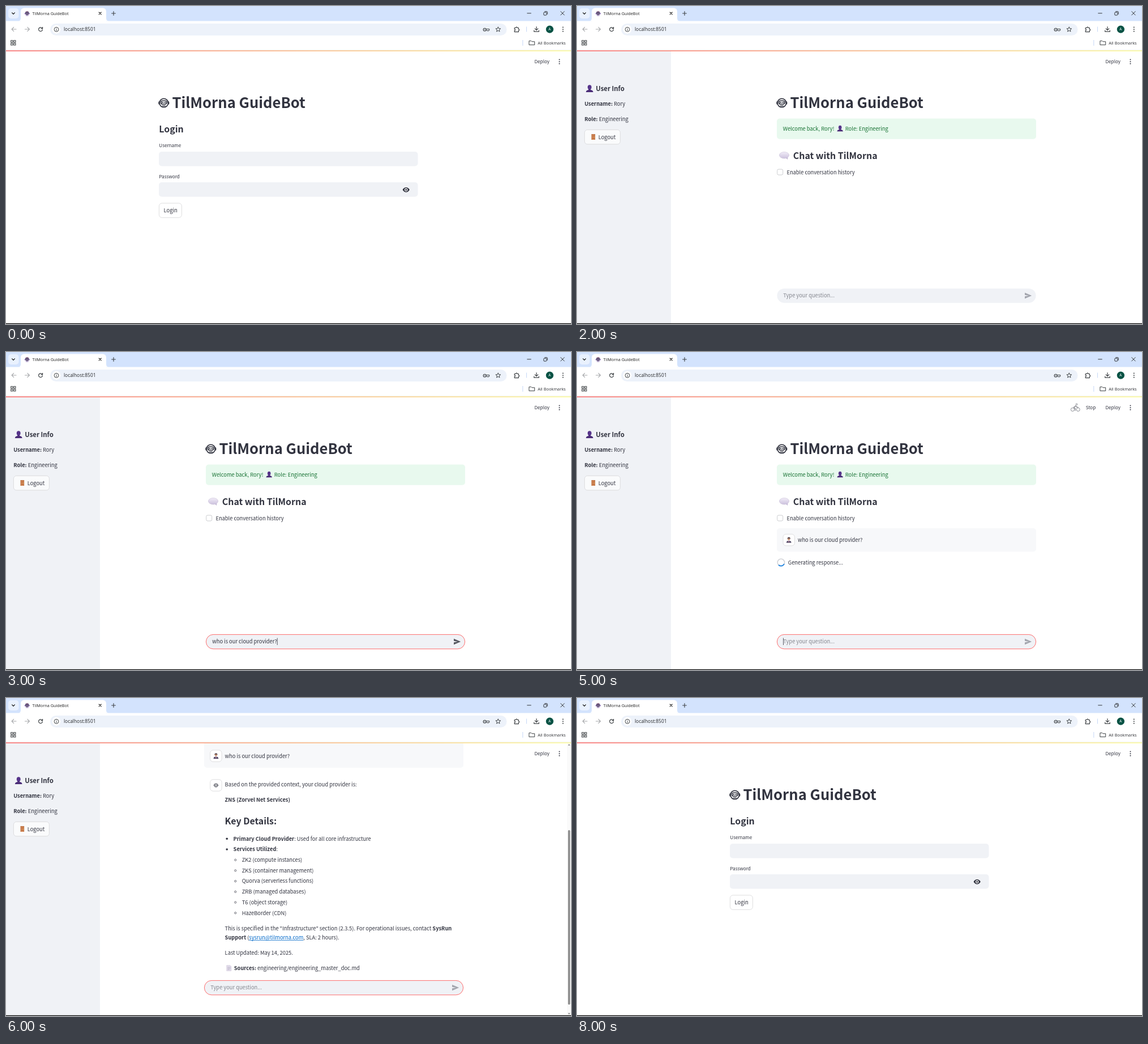
Animation, 998 px wide and 561 px high, one loop 9000 ms. Source, as an HTML page with a canvas:

```html
<!DOCTYPE html>
<html lang="en">
<head>
<meta charset="utf-8">
<title>TilMorna GuideBot</title>
<style>
html, body { margin: 0; width: 100%; height: 100%; overflow: hidden; background: #fff; }
canvas { display: block; width: 998px; height: 561px; }
</style>
</head>
<body>
<canvas id="stage"></canvas>
<script>
const W = 998, H = 561, LOOP = 9000;
const cv = document.getElementById('stage'), g = cv.getContext('2d');
const dpr = window.devicePixelRatio || 1;
cv.width = Math.round(W * dpr);
cv.height = Math.round(H * dpr);

const APP = '"Noto Sans CJK JP", "Noto Sans CJK SC", "Noto Sans CJK KR", "Noto Sans CJK", "Open Sans", sans-serif';
const UI = '"Open Sans", "Noto Sans", sans-serif';
const INK = '#31333f', RED = '#ff4b4b', PALE = '#f0f2f6', LINE = '#d6d6d9', HINT = '#84868e', CHROME = '#3c4043';
const BODY = 9.31, LABEL = 8.15, HEAD = 15.9, TITLE = 25.6;
const BRAND = 'TilMorna', BOT = BRAND + ' GuideBot', USER = 'Rory', ROLE = 'Engineering';
const QUESTION = 'who is our cloud provider?';

function box(x, y, w, h, r, fill, stroke, lw = 0.8) {
  g.beginPath();
  g.roundRect(x, y, w, h, r);
  paint(fill, stroke, lw);
}
function dot(x, y, r, fill, stroke, lw = 1) {
  g.beginPath();
  g.arc(x, y, r, 0, 7);
  paint(fill, stroke, lw);
}
function paint(fill, stroke, lw) {
  if (fill) { g.fillStyle = fill; g.fill(); }
  if (stroke) { g.strokeStyle = stroke; g.lineWidth = lw; g.stroke(); }
}
function icon(x, y, d, fill, stroke, lw = 1) {
  const p = new Path2D(d);
  g.save();
  g.translate(x, y);
  g.lineCap = g.lineJoin = 'round';
  if (fill) { g.fillStyle = fill; g.fill(p); }
  if (stroke) { g.strokeStyle = stroke; g.lineWidth = lw; g.stroke(p); }
  g.restore();
}
// Text centred on y by its capitals; ** toggles bold. Returns the end x.
function text(s, x, y, size = BODY, color = INK, family = APP) {
  g.fillStyle = color;
  s.split('**').forEach((part, i) => {
    g.font = `${i % 2 ? 700 : 400} ${size}px ${family}`;
    g.fillText(part, x, y + size * 0.365);
    x += g.measureText(part).width;
  });
  return x;
}
function kebab(x, y, color) {
  for (let i = -1; i < 2; i++) dot(x, y + i * 3.6, 1, color);
}

function browser() {
  box(0, 0, W, 26.5, 0, '#d3e3fd');
  box(4, 4, 18.5, 18, 5, '#e9f1fe');
  icon(13, 13, 'M-2.4-1.1 0 1.3 2.4-1.1', null, '#1f1f1f', 1.3);
  box(26, 3.5, 151, 24, [6, 6, 0, 0], '#fff');
  icon(26, 26.5, 'M0-5Q0 0-5 0H0Z', '#fff');
  icon(177, 26.5, 'M0-5Q0 0 5 0H0Z', '#fff');
  favicon(37.3, 13.2);
  text(BOT, 46.5, 13.2, 7.3, '#1f1f1f', UI);
  icon(166.2, 13, 'M-2-2 2 2M2-2-2 2', null, '#1f1f1f', 1.1);
  icon(190, 13, 'M-3.4 0H3.4M0-3.4V3.4', null, CHROME, 1.1);
  icon(924, 12.8, 'M-3.3 0H3.3', null, '#222', 0.9);
  box(949.8, 11.2, 5, 5, 1, null, '#222', 0.9);
  icon(953, 13, 'M-1.3-3.3H2Q3.3-3.3 3.3-2V1.4', null, '#222', 0.9);
  icon(983, 12.8, 'M-3.2-3.2 3.2 3.2M3.2-3.2-3.2 3.2', null, '#222', 0.9);

  icon(14, 41, 'M4-0H-3.8M-0.3-3.6-3.9 0-0.3 3.6', null, '#a5a7aa', 1.1);
  icon(37.5, 41, 'M-4 0H3.8M0.3-3.6 3.9 0 0.3 3.6', null, '#a5a7aa', 1.1);
  icon(61, 41, 'M2.9-1.6A3.4 3.4 0 1 0 3.4 0.8M3.6-3.6V-1H1', null, CHROME, 1.2);
  box(78, 31, 806.5, 21, 10.5, '#edf2fa');
  dot(89, 41.3, 7.5, '#fff');
  dot(89, 41.3, 3.9, null, CHROME, 1);
  icon(89, 41.3, 'M0-0.2V1.9M0-1.9V-1.8', null, CHROME, 1);
  text('localhost:8501', 102, 41.4, 8.4, '#26282b', UI);
  dot(845.6, 41.7, 2.5, null, CHROME, 1.1);
  dot(845.6, 41.7, 0.8, CHROME);
  icon(850.5, 41.7, 'M-2.2-1.1H3.2V1.3H1.8V2.2H0V1.3H-2.2', null, CHROME, 1);
  star(869.3, 41.4);
  icon(902, 41.5, 'M-3.8-3H-1.4A1.3 1.3 0 0 1 1.2-3H3.3V-0.7A1.3 1.3 0 0 1 3.3 1.9V4.2H-3.8V1.9A1.3 1.3 0 0 0-3.8-0.7Z', null, CHROME, 1.2);
  box(919, 36.5, 1, 9, 0, '#c6d8f7');
  icon(937, 41, 'M0-4.3V1.4M-2.8-1.1 0 1.6 2.8-1.1M-4.3 2V4.2H4.3V2', null, CHROME, 1.2);
  dot(960.4, 41.2, 6.6, '#075244');
  text('A', 958.3, 41.2, 6.3, '#fff', UI);
  kebab(983.8, 41.2, CHROME);

  for (const x of [8.7, 13.7]) for (const y of [60.8, 65.8]) box(x, y, 3.2, 3.2, 0, null, CHROME, 1.1);
  box(912.3, 60, 1, 10, 0, '#c6d8f7');
  icon(929, 65, 'M-4.7-3.4H-1.2L0-2.2H4.7V3.6H-4.7Z', null, CHROME, 1);
  text('All Bookmarks', 939.3, 65.1, 7.4, '#303236', UI);
}
function star(x, y) {
  g.beginPath();
  for (let i = 0; i < 10; i++) {
    const a = i * Math.PI / 5 - Math.PI / 2, r = i % 2 ? 2 : 4.6;
    g.lineTo(x + r * Math.cos(a), y + r * Math.sin(a));
  }
  g.closePath();
  paint(null, CHROME, 1);
}
function favicon(x, y) {
  dot(x - 3.6, y + 0.3, 1.1, '#8d66c5');
  dot(x + 3.6, y + 0.3, 1.1, '#8d66c5');
  box(x - 3.4, y - 3.4, 6.8, 5.6, 2.4, '#4c3b62');
  box(x - 2.6, y + 2.2, 5.2, 2.2, 1, '#a391bd');
  dot(x - 1.4, y - 0.6, 0.8, '#e7dcf5');
  dot(x + 1.4, y - 0.6, 0.8, '#e7dcf5');
  dot(x, y - 4, 0.7, '#d36a96');
}
function robot(x, y, s) {
  g.save();
  g.translate(x, y);
  g.scale(s, s);
  box(-9.5, -2.4, 2.8, 4.8, 1.2, INK);
  box(6.7, -2.4, 2.8, 4.8, 1.2, INK);
  dot(0, 0, 7.7, '#fff', INK, 1.8);
  box(-5.2, -3.8, 10.4, 6.2, 3.1, '#fff', INK, 1.5);
  icon(0, 0, 'M-3.4 0.1Q-2.2-2.2-1 0.1M1 0.1Q2.2-2.2 3.4 0.1', null, INK, 1.2);
  icon(0, 0, 'M-2.4 4.9Q0 5.7 2.4 4.9', null, INK, 1.2);
  g.restore();
}
function person(x, y, s) {
  g.save();
  g.translate(x, y);
  g.scale(s, s);
  icon(0, 0, 'M-6.5 6.4Q-6.3 2.8-2.1 2.2L-1.7 0H1.7L2.1 2.2Q6.3 2.8 6.5 6.4Z', '#4b2d78');
  g.beginPath();
  g.ellipse(0, -2.5, 3.5, 4.2, 0, 0, 7);
  paint('#56348a');
  g.restore();
}
function userFace(x, y) {
  box(x - 10.2, y - 10.2, 20.4, 20.4, 5, '#fff', LINE);
  icon(x, y, 'M-4.4 5Q-4.2 1.7-1.2 1.3H1.2Q4.2 1.7 4.4 5Z', '#514764');
  icon(x, y, 'M-1.4 1.2H1.4L0 4Z', '#e8e5ee');
  icon(x, y, 'M0 1.6V4', null, '#9b4968', 0.8);
  dot(x, y - 1.6, 2.2, '#c99576');
  icon(x, y, 'M-2.5-1.6Q-2.8-4.8 0.2-4.8 2.8-4.7 2.5-1.6 1.6-3 0-2.9-1.6-3-2.5-1.6Z', '#44333b');
}
function door(x, y) {
  box(x - 3.3, y - 4.9, 6.6, 9.8, 0.5, '#b0683a');
  box(x - 2.6, y - 4.2, 5.2, 9.1, 0.3, '#d88c5c');
  box(x - 1.7, y - 3.2, 3.4, 3, 0, '#c27646');
  box(x - 1.7, y + 0.9, 3.4, 3, 0, '#c27646');
  dot(x + 1.8, y + 0.3, 0.6, '#f2c868');
}
function balloon(x, y) {
  const fill = g.createLinearGradient(0, y - 6, 0, y + 6);
  fill.addColorStop(0, '#f0ebf7');
  fill.addColorStop(1, '#c9bedb');
  icon(x, y, 'M2 3 5.9 6.9 6.4 2Z', '#c1b4d4');
  g.beginPath();
  g.ellipse(x, y - 0.8, 8.6, 5.7, 0, 0, 7);
  paint(fill, '#c8bfd7', 0.6);
}
function page(x, y) {
  icon(x, y, 'M-3.7-4.8H2L3.9-2.9V4.8H-3.7Z', '#e4deec', '#c6bdd3', 0.6);
  icon(x, y, 'M-2.2-1.5H2.2M-2.2 0.5H2.2M-2.2 2.5H1', null, '#a29ab2', 0.6);
}
function cyclist(x, y) {
  const c = '#6f717a';
  dot(x - 4.9, y + 3.5, 3, null, c, 0.8);
  dot(x + 4.9, y + 3.5, 3, null, c, 0.8);
  dot(x + 2.2, y - 5.6, 1.4, null, c, 0.8);
  icon(x, y, 'M-0.2 5.2V1.8L-2.9-0.3 0.4-3.2 2.4-0.8H4.8', null, c, 1.1);
}
function runner(x, y) {
  const c = '#6f717a';
  dot(x + 2.2, y - 5.4, 1.4, null, c, 0.8);
  icon(x, y, 'M-4-0.6-2.8-3 1-3.2 2.6-0.8 5-1.6M0.6-3-0.8 0.8 2 3 1.2 6.6M-0.8 1-2 4H-5.4', null, c, 1.1);
}

function header() {
  const line = g.createLinearGradient(0, 0, W, 0);
  line.addColorStop(0, RED);
  line.addColorStop(1, '#fffd80');
  box(0, 77.8, W, 0.7, 0, '#dcdfe4');
  box(0, 78.4, W, 1.4, 0, line);
  text('Deploy', 933.5, 98.4, LABEL);
  kebab(977.5, 98.2, INK);
}
function title(x) {
  robot(x + 8.8, 171, 1);
  text(`**${BOT}**`, x + 23.4, 171, TITLE);
}

function login(filled) {
  title(270);
  text('**Login**', 270.3, 217.5, HEAD);
  text('Username', 270.3, 246.5, LABEL);
  box(270, 257, 457.5, 25.5, 5, PALE);
  text('Password', 270.3, 301, LABEL);
  box(270, 311, 457.5, 25.5, 5, PALE);
  icon(706.7, 324.3, 'M-6.2 0Q-3.6-4.2 0-4.2T6.2 0Q3.6 4.2 0 4.2T-6.2 0Z', INK);
  dot(706.7, 324.3, 2.1, INK, '#fff', 1.2);
  box(270.4, 347.9, 40, 25.4, 5, '#fff', filled ? RED : LINE);
  text('Login', 278.6, 360.4, BODY, filled ? RED : INK);
  if (filled) {
    text(USER, 281, 269.8);
    for (let i = 0; i < 7; i++) dot(282.6 + i * 4.8, 324.2, 1.7, INK);
  }
}
function sidebar(hover) {
  box(0, 80, 166, 480, 0, PALE);
  person(22.2, 145.8, 0.98);
  text('**User Info**', 33.3, 146, 11.4);
  text(`**Username:** ${USER}`, 13.2, 172.3);
  text(`**Role:** ${ROLE}`, 13.2, 199.3);
  box(13.4, 218.4, 63, 25.4, 5, '#fafbfc', hover ? RED : LINE);
  door(28.8, 231);
  text('Logout', 37.8, 231.2, BODY, hover ? RED : INK);
}
function prompt(x, focus, typed) {
  box(x + 0.4, 498.4, 457.2, 25.4, 12.7, PALE, focus && RED);
  const end = text(typed || 'Type your question...', x + 11.3, 510.8, BODY, typed ? INK : HINT);
  icon(x + 444, 511, 'M-6-5.3 6.2 0-6 5.3V1.2L1 0-6-1.2Z', typed ? '#55575f' : '#a3a5ad');
  return end;
}
function caret(x) {
  box(x, 504.5, 0.8, 12.5, 0, INK);
}
function chat() {
  title(353);
  box(353, 198.5, 458, 36.3, 5, '#e8f9ee');
  const green = '#177233';
  text(`Welcome back, ${USER}!`, 363.8, 216.6, BODY, green);
  person(464.7, 216.2, 0.8);
  text(`Role: ${ROLE}`, 473.8, 216.6, BODY, green);
  balloon(366, 264);
  text(`**Chat with ${BRAND}**`, 381.8, 264.3, HEAD);
  box(353.7, 288, 10, 10, 2.4, '#fff', '#bfc0c5');
  text('Enable conversation history', 370.4, 293.2);
}
function waiting(angle, sport) {
  chat();
  sport(880.3, 98);
  text('Stop', 898.8, 98.2, LABEL);
  box(353, 311, 458, 41.3, 5, '#f7f8fa');
  userFace(374.2, 331.6);
  text(QUESTION, 390, 331.9);
  dot(360.4, 371.2, 6.2, null, '#d4d5d9', 1.7);
  g.beginPath();
  g.arc(360.4, 371.2, 6.2, angle - 0.95, angle + 0.95);
  paint(null, '#1c83e1', 1.9);
  text('Generating response...', 372.8, 371.6);
  prompt(353, true);
  caret(364.2);
}
function answer() {
  const x = 386.6;
  box(350, 80, 458, 43, [0, 0, 5, 5], '#f7f8fa');
  userFace(370.9, 102.2);
  text(QUESTION, x, 102.5);
  box(360.7, 143.8, 20.4, 20.4, 5, '#fff', LINE);
  robot(370.9, 154, 0.42);
  text('Based on the provided context, your cloud provider is:', x, 152.4);
  text('**ZNS (Zorvel Net Services)**', x, 179.4);
  text('**Key Details:**', x, 217.2, HEAD);
  ['**Primary Cloud Provider**: Used for all core infrastructure', '**Services Utilized**:'].forEach((s, i) => {
    const y = 248.3 + i * 18.7;
    dot(390.2, y, 1.8, INK);
    text(s, 401.6, y);
  });
  ['ZK2 (compute instances)', 'ZKS (container management)', 'Quorva (serverless functions)',
   'ZRB (managed databases)', 'T6 (object storage)', 'HazeBorder (CDN)'].forEach((s, i) => {
    const y = 285.7 + i * 18.7;
    dot(405.2, y, 1.6, null, INK, 0.7);
    text(s, 416.7, y);
  });
  text('This is specified in the "Infrastructure" section (2.3.5). For operational issues, contact **SysRun**', x, 406.3);
  const from = text('**Support** (', x, 422.9);
  const to = text('sysrun@tilmorna.com', from, 422.9, BODY, '#0068c9');
  box(from, 427.3, to - from, 0.7, 0, '#0068c9');
  text(', SLA: 2 hours).', to, 422.9);
  text('Last Updated: May 14, 2025.', x, 449.8);
  page(393.8, 476.5);
  text('**Sources:** engineering/engineering_master_doc.md', 402.8, 476.8);
  prompt(350, true);

  box(991, 80, 7, 480, 0, '#fafafa');
  box(992.8, 233, 3.6, 308, 1.8, '#8b8b8b');
  icon(994.6, 82.5, 'M-2 1.2H2L0-1.4Z', '#8b8b8b');
  icon(994.6, 557, 'M-2-1.2H2L0 1.4Z', '#8b8b8b');
}

// One scene per second.
const scenes = [
  () => login(false),
  () => login(true),
  () => { sidebar(); chat(); prompt(353, false); },
  () => { sidebar(); chat(); caret(prompt(353, true, QUESTION)); },
  () => { sidebar(); waiting(-0.8, runner); },
  () => { sidebar(); waiting(1.4, cyclist); },
  () => { sidebar(); answer(); },
  () => { sidebar(true); waiting(2.9, runner); },
  () => login(false)
];

function frame() {
  const t = performance.now() % LOOP;
  g.setTransform(dpr, 0, 0, dpr, 0, 0);
  box(0, 0, W, H, 0, '#fff');
  browser();
  scenes[Math.floor(t / 1000)]();
  header();
  box(0, 559.7, W, 1.3, 0, '#0d0d0d');
  requestAnimationFrame(frame);
}
frame();
</script>
</body>
</html>
```
